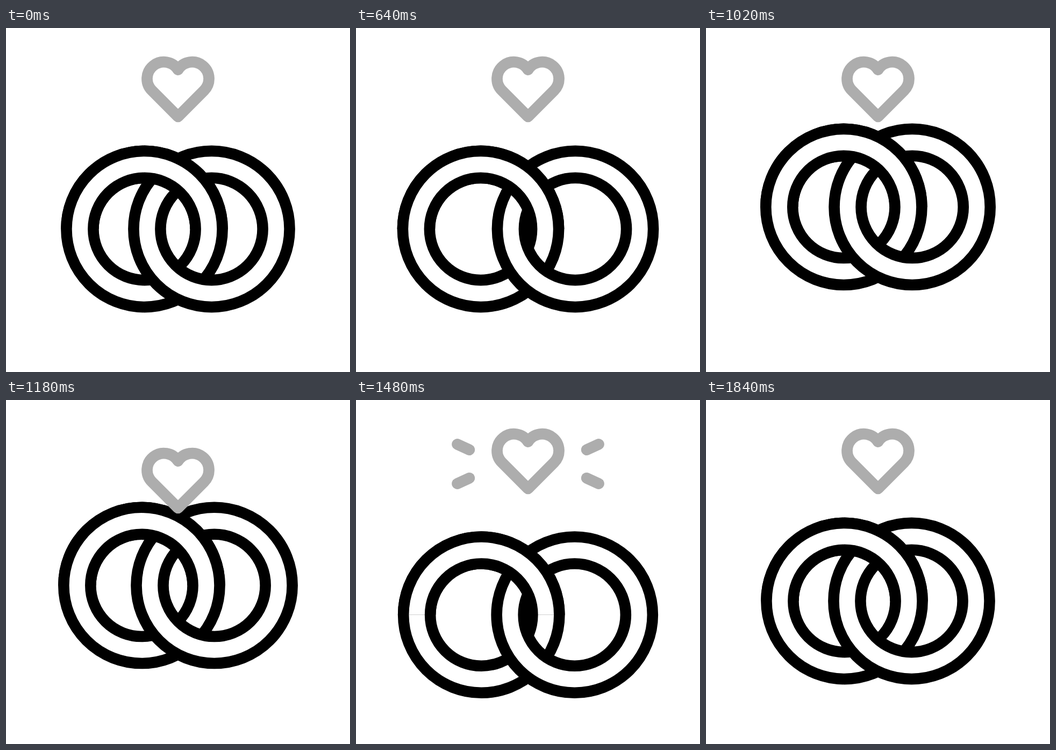
Recreate the animation shown at these times as an HTML page. Size 640 px wide and 640 px high, loop 2.48 s.

```html
<!DOCTYPE html>
<html lang="en">
<head>
<meta charset="utf-8">
<title>Wedding rings</title>
<style>
  html, body { margin: 0; width: 100%; height: 100%; overflow: hidden; background: #fff; }
  svg { display: block; width: 100%; height: 100%; }
</style>
</head>
<body>
<svg viewBox="0 0 640 640" fill="none">
  <defs>
    <clipPath id="upperHalf"><rect x="-320" y="-200" width="640" height="200"/></clipPath>
    <g id="ring">
      <circle r="120.1" stroke="#000" stroke-width="70.6"/>
      <circle r="120.1" stroke="#fff" stroke-width="29.4"/>
    </g>
  </defs>
  <g id="rings">
    <use class="left" href="#ring"/>
    <use class="right" href="#ring"/>
    <g clip-path="url(#upperHalf)"><use class="left" href="#ring"/></g>
  </g>
  <g stroke="#adadad" stroke-width="20.7" stroke-linecap="round" stroke-linejoin="round">
    <path id="heart" d="M320 165 L271.5 116.3 A31.2 31.2 0 1 1 320 77.6 A31.2 31.2 0 1 1 368.5 116.3 Z"/>
    <path id="rays"/>
  </g>
</svg>
<script>
  const LOOP = 2480, STEP = 20;
  const $ = id => document.getElementById(id);
  const ease = p => (1 - Math.cos(Math.PI * p)) / 2;

  // Tracks are lists of [time, value], eased between neighbours.
  const spread = [[0, 62.5], [640, 88], [1080, 62.5], [1420, 88], [1840, 62.5]];
  const ringY = [[640, 0], [1080, -43], [1420, 27], [1840, 0]];
  const heartY = [[1080, 0], [1200, 38.5], [1360, -15], [1460, 0]];
  const rayLength = [[1320, 0], [1420, 1], [1620, 1], [1760, 0]];

  function valueAt(track, t) {
    if (t <= track[0][0]) return track[0][1];
    for (let i = 1; i < track.length; i++) {
      const [t0, a] = track[i - 1], [t1, b] = track[i];
      if (t < t1) return a + (b - a) * ease((t - t0) / (t1 - t0));
    }
    return track[track.length - 1][1];
  }

  // Four rays mirrored around the heart, growing outwards.
  function rayPath(length) {
    if (length <= 0) return "";
    let d = "";
    for (const sx of [-1, 1])
      for (const sy of [-1, 1])
        d += `M${320 + sx * 109.2} ${119 + sy * 26.3}l${sx * 22.3 * length} ${sy * 10.3 * length}`;
    return d;
  }

  function place(selector, x) {
    document.querySelectorAll(selector).forEach(el => el.setAttribute("x", x));
  }

  function draw(t) {
    const d = valueAt(spread, t);
    place(".left", -d);
    place(".right", d);
    $("rings").setAttribute("transform", `translate(320 ${374 + valueAt(ringY, t)})`);
    $("heart").setAttribute("transform", `translate(0 ${valueAt(heartY, t)})`);
    $("rays").setAttribute("d", rayPath(valueAt(rayLength, t)));
  }

  const start = performance.now();
  function tick() {
    const t = (performance.now() - start) % LOOP;
    draw(Math.floor(t / STEP) * STEP);
    requestAnimationFrame(tick);
  }
  tick();
</script>
</body>
</html>
```
